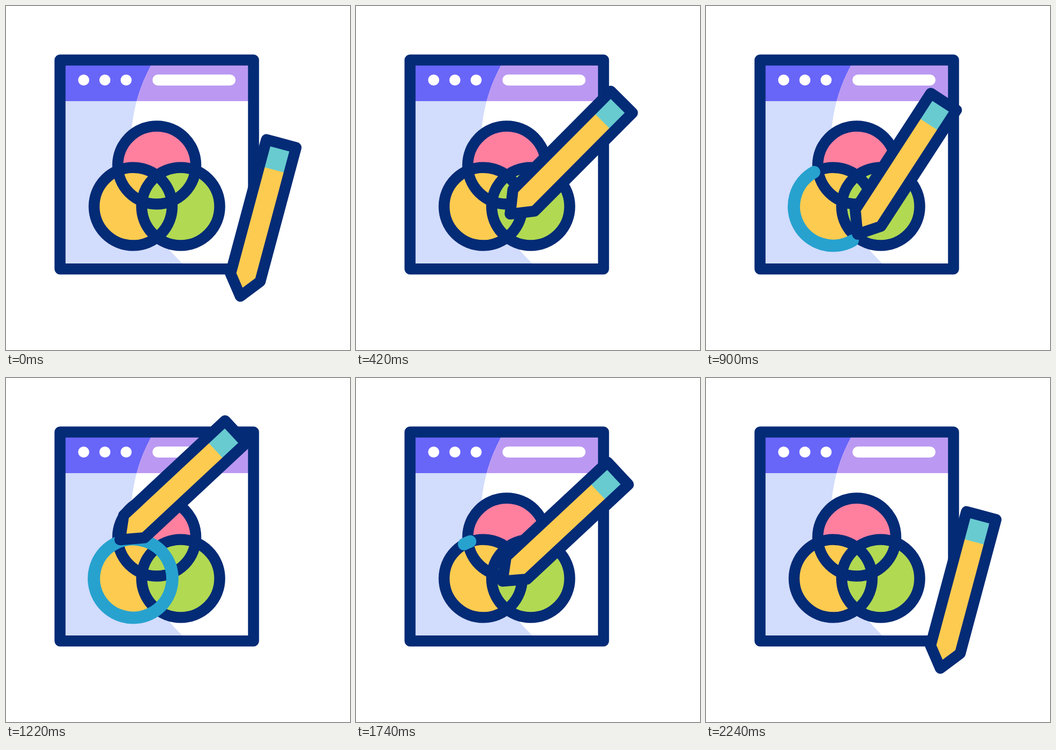
An HTML page for the animation above (2.4 s loop, 640 by 640 pixels).

```html
<!DOCTYPE html>
<html lang="en">
<head>
<meta charset="utf-8">
<title>Design tool icon</title>
<style>
  html, body { margin: 0; width: 100%; height: 100%; overflow: hidden; background: #fff; }
  svg { display: block; width: 100vw; height: 100vh; }
  .line { fill: none; stroke: #042b76; stroke-width: 20.5; stroke-linejoin: round; }
</style>
</head>
<body>
<svg viewBox="0 0 640 640">
  <defs>
    <clipPath id="lit"><circle cx="538" cy="257" r="305.6"/></clipPath>
  </defs>

  <path fill="#d2dcfd" d="M100 100H460V489H100Z"/>
  <path fill="#6865f9" d="M100 100H460V177H100Z"/>
  <g clip-path="url(#lit)">
    <path fill="#fff" d="M100 100H460V489H100Z"/>
    <path fill="#bb99f2" d="M100 100H460V177H100Z"/>
  </g>
  <g fill="#fff">
    <circle cx="144.5" cy="137.7" r="10.3"/>
    <circle cx="184" cy="137.7" r="10.3"/>
    <circle cx="223.5" cy="137.7" r="10.3"/>
    <rect x="272.5" y="127.4" width="154.5" height="20.6" rx="10.3"/>
  </g>
  <path class="line" d="M100.5 100.5H460.5V489.2H100.5Z"/>

  <circle cx="280.5" cy="296" r="73" fill="#ff7f9f"/>
  <circle cx="236.5" cy="373" r="73" fill="#fdcb50"/>
  <circle cx="325" cy="373" r="73" fill="#b1d952"/>
  <g class="line">
    <circle cx="280.5" cy="296" r="72.6"/>
    <circle cx="236.5" cy="373" r="72.6"/>
    <circle cx="325" cy="373" r="72.6"/>
  </g>

  <circle id="trail" r="73" pathLength="360" fill="none" stroke="#27a2cf" stroke-width="23"
    stroke-linecap="round" transform="translate(236.5 373) rotate(-119) scale(1 -1)"/>

  <g id="pencil">
    <path fill="#fdcb50" d="M-28.5-294H28.5V-36L0 0L-28.5-36Z"/>
    <path fill="#68cbd0" d="M-28.5-294H28.5V-243.5H-28.5Z"/>
    <path class="line" d="M-28.5-294H28.5V-36L0 0L-28.5-36Z"/>
  </g>
</svg>
<script>
  const LOOP = 2400;
  const HALF = 147; // pencil tip to its middle
  const RAD = Math.PI / 180;
  const REST = [474, 398];
  const DRAW_START = [317.7, 198.9];
  const DRAW_END = [319.5, 200.7];
  const TILT = [[200, 15], [450, 46], [600, 46], [900, 33], [1060, 48.5],
    [1200, 47], [1750, 47], [2240, 15]];

  const trail = document.getElementById('trail');
  const pencil = document.getElementById('pencil');

  const ease = (t, from, to) => {
    const p = Math.min(1, Math.max(0, (t - from) / (to - from)));
    return p * p * (3 - 2 * p);
  };
  const mix = (a, b, p) => a + (b - a) * p;

  function tiltAt(t) {
    let angle = TILT[0][1];
    for (let i = 1; i < TILT.length; i++) {
      const [from] = TILT[i - 1], [to, value] = TILT[i];
      angle = mix(angle, value, ease(t, from, to));
    }
    return angle;
  }

  function tipAt(t, tilt) {
    if (t >= 600 && t < 1200) {
      const a = (-119 - 360 * ease(t, 600, 1200)) * RAD;
      return [246.5 + 71 * Math.cos(a), 363 + 71 * Math.sin(a)];
    }
    const going = t < 600;
    const p = going ? ease(t, 200, 600) : 1 - ease(t, 1400, 2200);
    const end = going ? DRAW_START : DRAW_END;
    const bulge = going ? 28 * p * (1 - p) : 0;
    return [
      mix(REST[0], end[0], p) + bulge - HALF * Math.sin(tilt * RAD),
      mix(REST[1], end[1], p) + HALF * Math.cos(tilt * RAD)
    ];
  }

  function render(t) {
    const tilt = tiltAt(t);
    const [x, y] = tipAt(t, tilt);
    pencil.setAttribute('transform', `translate(${x} ${y}) rotate(${tilt})`);

    const head = 360 * ease(t, 600, 1200);
    const tail = 360 * ease(t, 1200, 1800);
    trail.style.display = head > tail ? '' : 'none';
    trail.setAttribute('stroke-dasharray', `${head - tail} 999`);
    trail.setAttribute('stroke-dashoffset', -tail);
  }

  const begin = performance.now();
  function tick() {
    render((performance.now() - begin) % LOOP);
    requestAnimationFrame(tick);
  }
  tick();
</script>
</body>
</html>
```
